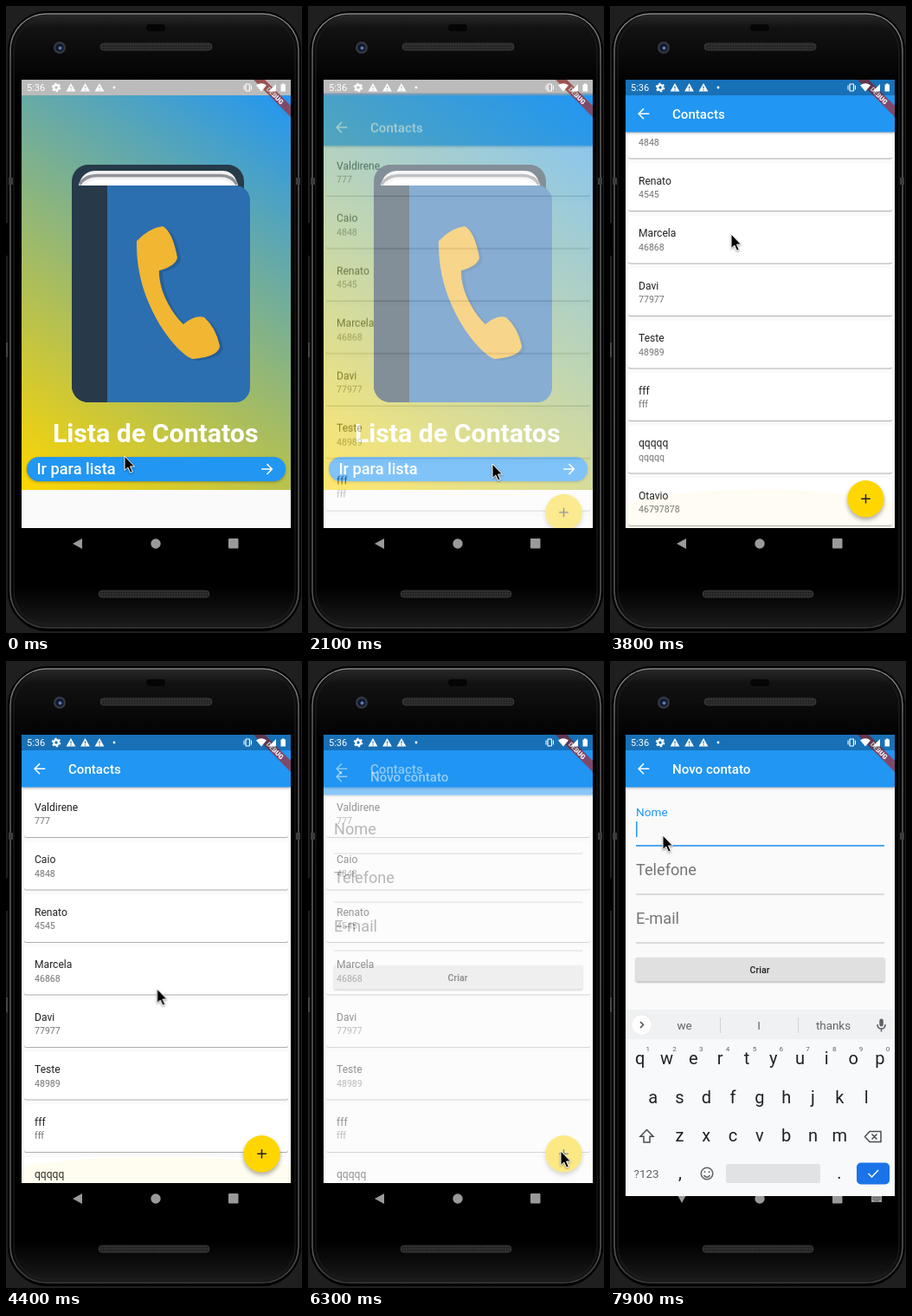
These frames come from a looping animation (342x723 px, 8000 ms). An HTML page:

```html
<!DOCTYPE html>
<html lang="pt">
<head>
<meta charset="utf-8">
<title>Lista de Contatos</title>
<style>
html, body { margin: 0; width: 100%; height: 100%; overflow: hidden; background: #1f1f1f; }
svg { display: block; width: 342px; height: 723px; font-family: Roboto, "Noto Sans", sans-serif; }
.mid { text-anchor: middle; }
.medium { font-weight: 500; }
.title { font-size: 15.1px; font-weight: 500; fill: #fff; }
.name { font-size: 12.1px; fill: #212121; }
.phone { font-size: 10.6px; fill: #757575; }
.label { font-size: 18.16px; fill: #757575; }
.key { font-size: 20px; fill: #202124; }
.hint { font-size: 8px; fill: #5f6368; }
.word { font-size: 13.4px; fill: #5f6368; }
.card { fill: #fff; filter: drop-shadow(0 1px .7px rgba(0,0,0,.3)); }
.bar { fill: #2196f3; filter: drop-shadow(0 1.5px 1.5px rgba(0,0,0,.3)); }
.line { fill: none; stroke-width: 1.5; }

.page, .page > g, #list, .glow, #label, #keys, .swap, .focus, #pointer {
  animation: 8s linear infinite both;
}
/* Page entry: fade in while sliding up a quarter of the screen */
#contacts { animation-name: fade1; }
#contacts > g { animation-name: rise1; }
#form { animation-name: fade2; }
#form > g { animation-name: rise2; }
@keyframes fade1 {
  0% { opacity: 0; }
  24% { opacity: 0; animation-timing-function: cubic-bezier(.42,0,1,1); }
  27.75%, 100% { opacity: 1; }
}
@keyframes rise1 {
  0% { transform: translateY(129px); }
  24% { transform: translateY(129px); animation-timing-function: cubic-bezier(.4,0,.2,1); }
  27.75%, 100% { transform: none; }
}
@keyframes fade2 {
  0% { opacity: 0; }
  76.2% { opacity: 0; animation-timing-function: cubic-bezier(.42,0,1,1); }
  79.95%, 100% { opacity: 1; }
}
@keyframes rise2 {
  0% { transform: translateY(129px); }
  76.2% { transform: translateY(129px); animation-timing-function: cubic-bezier(.4,0,.2,1); }
  79.95%, 100% { transform: none; }
}

#list { animation-name: scroll; }
@keyframes scroll {
  0% { transform: none; }
  40% { transform: none; animation-timing-function: steps(7, jump-start); }
  48.75% { transform: translateY(-88px); }
  51.25% { transform: translateY(-88px); animation-timing-function: steps(4, jump-start); }
  56.25%, 100% { transform: none; }
}
.glow { fill: #ffd600; }
#glowTop { transform-origin: 0 145.5px; animation-name: glowTop; }
#glowEnd { transform-origin: 0 602px; animation-name: glowEnd; }
@keyframes glowTop {
  0%, 56.25% { transform: scaleY(0); opacity: 0; }
  62.5%, 66.25% { transform: none; opacity: .2; }
  71.25%, 100% { transform: scaleY(0); opacity: 0; }
}
@keyframes glowEnd {
  0%, 46.25% { transform: scaleY(0); opacity: 0; }
  47.5% { transform: scaleY(.85); opacity: .05; }
  62.5%, 66.25% { transform: scaleY(.3); opacity: .08; }
  70%, 100% { transform: scaleY(0); opacity: 0; }
}

#label { transform-origin: 30px 191px; animation-name: float; }
@keyframes float {
  0%, 94.9% { transform: none; fill: #757575; }
  97.5%, 100% { transform: translateY(-12px) scale(.75); fill: #2196f3; }
}
.focus { fill: #2196f3; animation-name: show; }
@keyframes show { 0%, 95% { opacity: 0; } 96.25%, 100% { opacity: 1; } }
#keys { animation-name: keys; }
@keyframes keys {
  0%, 95.4% { transform: translateY(23px); opacity: 0; }
  98.6%, 100% { transform: none; opacity: 1; }
}
.swap { animation-timing-function: step-end; }
#navBack { animation-name: hide; }
#navDown { animation-name: appear; }
@keyframes hide { 0% { opacity: 1; } 96.25%, 100% { opacity: 0; } }
@keyframes appear { 0% { opacity: 0; } 96.25%, 100% { opacity: 1; } }

#pointer { animation-name: point; animation-timing-function: steps(1, jump-start); }
@keyframes point {
  0% { transform: translate(136px,518px); }
  2.5% { transform: translate(136px,518px); animation-timing-function: steps(4, jump-start); }
  7.5% { transform: translate(190px,539px); animation-timing-function: steps(3, jump-start); }
  11.25%, 15% { transform: translate(213px,535px); }
  16.25% { transform: translate(175px,530px); }
  17.5% { transform: translate(164px,534px); }
  18.75% { transform: translate(190px,529px); }
  20%, 36.25% { transform: translate(212px,527px); }
  37.5% { transform: translate(171px,372px); }
  38.75% { transform: translate(171px,372px); animation-timing-function: steps(8, jump-start); }
  48.75% { transform: translate(139px,262px); }
  50% { transform: translate(139px,262px); animation-timing-function: steps(9, jump-start); }
  61.25% { transform: translate(201px,469px); }
  66.25% { transform: translate(201px,469px); animation-timing-function: steps(4, jump-start); }
  71.25%, 72.5% { transform: translate(280px,559px); }
  73.75% { transform: translate(297px,566px); }
  75% { transform: translate(291px,564px); }
  83.75% { transform: translate(291px,564px); animation-timing-function: steps(4, jump-start); }
  88.75% { transform: translate(37px,183px); animation-timing-function: steps(2, jump-start); }
  91.25%, 92.5% { transform: translate(58px,207px); }
  93.75%, 95% { transform: translate(56px,203px); }
  96.25%, 100% { transform: translate(60px,200px); }
}
.sky { width: 311px; height: 455px; background: linear-gradient(214.35deg, #2196f3, #ffd600); }
</style>
</head>
<body>
<svg viewBox="0 0 342 723" xmlns="http://www.w3.org/2000/svg">
  <defs>
    <clipPath id="screen"><rect x="18" y="85" width="311" height="517"/></clipPath>
    <clipPath id="view"><rect x="18" y="145.5" width="311" height="456.5"/></clipPath>
    <linearGradient id="body" x2="0" y2="1">
      <stop offset="0" stop-color="#2b2b2b"/><stop offset=".025" stop-color="#121212"/>
      <stop offset=".12" stop-color="#000"/><stop offset=".93" stop-color="#000"/>
      <stop offset="1" stop-color="#1c1c1c"/>
    </linearGradient>
    <linearGradient id="rim" x2="0" y2="1">
      <stop offset="0" stop-color="#8a8a8a"/><stop offset=".08" stop-color="#5c5c5c"/>
      <stop offset=".95" stop-color="#555"/><stop offset="1" stop-color="#3a3a3a"/>
    </linearGradient>
    <pattern id="mesh" width="3" height="3" patternUnits="userSpaceOnUse">
      <rect width="3" height="3" fill="#2e2e2e"/><circle cx="1.5" cy="1.5" r=".8" fill="#161616"/>
    </pattern>
    <path id="back" d="M6.3 0H-5.6M0-5.9-5.9 0 0 5.9" class="line"/>
    <path id="warn" d="M0-5 5.4 4.5H-5.4ZM-.6-1.6V1.3H.6V-1.6ZM-.6 2.2V3.4H.6V2.2Z" fill-rule="evenodd"/>
    <path id="handset" d="M151 271Q165 256 181 254Q192 259 198 290Q196 300 177 305C176 325 189 352 205 367Q218 356 229 359Q242 370 247 392Q246 404 217 407C205 408 149 350 151 271Z"/>
  </defs>

  <!-- Phone -->
  <rect width="342" height="723" fill="#1f1f1f"/>
  <rect y="250" width="5" height="38" rx="1.5" fill="#000"/>
  <rect y="388" width="2" height="17" fill="#444"/>
  <rect x="4" y="8" width="335" height="711" rx="44" fill="url(#body)" stroke="#000" stroke-width="4"/>
  <rect x="5" y="9" width="333" height="708" rx="42" fill="none" stroke="url(#rim)" stroke-width="1.6"/>
  <rect x="9" y="14" width="325" height="699" rx="38" fill="none" stroke="#202020"/>
  <path d="M3 198H8V206H3ZM335 198H340V206H335Z" fill="#3c3c3c"/>
  <rect x="162" y="21" width="22" height="8" rx="4" fill="#050505"/>
  <circle cx="62" cy="48" r="7" fill="#333842"/>
  <circle cx="62" cy="48" r="4.6" fill="#10182c"/>
  <circle cx="62.5" cy="48.5" r="2" fill="#5a78b4"/>
  <rect x="109" y="43" width="129" height="8" rx="4" fill="url(#mesh)" stroke="#3a3a3a"/>
  <rect x="107" y="674" width="128" height="8" rx="4" fill="url(#mesh)" stroke="#333"/>

  <g fill="#9a9a9a">
    <path id="navBack" class="swap" d="M77 620 88 614V626Z"/>
    <g id="navDown" class="swap">
      <path d="M77 614H89L83 625Z"/>
      <path d="M302 615H314V624H302Z"/>
      <path d="M303.5 618.5H312.5M303.5 620.5H312.5M305.5 622.5H310.5" stroke="#222" stroke-dasharray="1 1"/>
    </g>
    <circle cx="173" cy="620" r="5.7"/>
    <rect x="257" y="614" width="11.5" height="11.5" rx="1"/>
  </g>

  <g clip-path="url(#screen)">
    <!-- Home -->
    <rect x="18" y="85" width="311" height="517" fill="#fafafa"/>
    <foreignObject x="18" y="103" width="311" height="455"><div class="sky"></div></foreignObject>
    <rect x="76" y="183" width="199" height="274" rx="19" fill="#263a4a"/>
    <path d="M84 207Q88 190 104 190H250Q264 190 268 207Z" fill="#f1f1f1"/>
    <path d="M85 206Q91 195.5 106 195.5H248Q261 195.5 267 206" fill="none" stroke="#8f9296" stroke-width="3.5"/>
    <path d="M91 207Q97 200 108 200H246Q257 200 262 207Z" fill="#fff"/>
    <path d="M76 207H117V457H95A19 19 0 0 1 76 438Z" fill="#263a4a"/>
    <path d="M117 207H265A17 17 0 0 1 282 224V440A17 17 0 0 1 265 457H117Z" fill="#2c6fb0"/>
    <use href="#handset" x="4" y="2" fill="#255f99"/>
    <use href="#handset" fill="#f1b632"/>
    <text x="172.7" y="502.5" class="mid" font-size="30.25" font-weight="700" fill="#fff">Lista de Contatos</text>
    <rect x="24" y="520" width="299" height="28" rx="14" class="bar"/>
    <text x="35.5" y="540.3" class="medium" font-size="18.16" fill="#fff">Ir para lista</text>
    <use href="#back" transform="translate(301.5 534) scale(-1 1)" stroke="#fff"/>

    <!-- Contact list -->
    <g id="contacts" class="page"><g>
      <rect x="18" y="85" width="311" height="517" fill="#fafafa"/>
      <g clip-path="url(#view)">
        <g id="list"></g>
        <ellipse id="glowTop" class="glow" cx="173.5" cy="-115.5" rx="466" ry="314"/>
        <ellipse id="glowEnd" class="glow" cx="173.5" cy="863" rx="466" ry="314"/>
      </g>
      <rect x="18" y="85" width="311" height="60.5" class="bar"/>
      <use href="#back" x="39" y="124.3" stroke="#fff"/>
      <text x="72" y="129.8" class="title">Contacts</text>
      <circle cx="295.5" cy="568.3" r="21.2" fill="#ffd600" style="filter:drop-shadow(0 3px 2.5px rgba(0,0,0,.32))"/>
      <path d="M290.2 568.3H300.8M295.5 563V573.6" class="line" stroke="#212121"/>
    </g></g>

    <!-- New contact -->
    <g id="form" class="page"><g>
      <rect x="18" y="85" width="311" height="517" fill="#fafafa"/>
      <rect x="18" y="85" width="311" height="60.5" class="bar"/>
      <use href="#back" x="39" y="124.3" stroke="#fff"/>
      <text x="72" y="129.8" class="title">Novo contato</text>
      <path d="M30 213H317M30 269H317M30 325H317" stroke="#b0b0b0" stroke-width=".9"/>
      <text id="label" x="30" y="191" class="label">Nome</text>
      <text x="30" y="247" class="label">Telefone</text>
      <text x="30" y="303" class="label">E-mail</text>
      <g class="focus">
        <rect x="30" y="212.2" width="287" height="1.5"/>
        <rect x="30" y="185" width="1.5" height="18"/>
      </g>
      <rect x="30" y="342" width="287" height="27.5" rx="1.5" fill="#e0e0e0" style="filter:drop-shadow(0 1px 1px rgba(0,0,0,.35))"/>
      <text x="173" y="359.5" class="mid medium" font-size="10.6" fill="#212121">Criar</text>
    </g></g>

    <!-- Debug ribbon -->
    <g transform="translate(329 85) rotate(45)">
      <rect x="-40" y="21.2" width="80" height="9.2" fill="#b71c1c" fill-opacity=".63"/>
      <text y="28.5" class="mid" font-size="7.7" font-weight="900" fill="#fff">DEBUG</text>
    </g>

    <!-- Status bar -->
    <rect x="18" y="85" width="311" height="18" fill="#000" fill-opacity=".25"/>
    <g fill="#fff">
      <text x="24" y="98" font-size="11">5:36</text>
      <circle cx="58" cy="94" r="2.8" fill="none" stroke="#fff" stroke-width="2.2"/>
      <circle cx="58" cy="94" r="4.5" fill="none" stroke="#fff" stroke-width="1.6" stroke-dasharray="2.36"/>
      <use href="#warn" x="75" y="94"/><use href="#warn" x="91.5" y="94"/><use href="#warn" x="108" y="94"/>
      <circle cx="125" cy="94" r="1.4"/>
      <rect x="277" y="90" width="4.5" height="8" rx=".7" fill="none" stroke="#fff" stroke-width="1.2"/>
      <path d="M275 91.5V96.5M283.5 91.5V96.5" stroke="#fff"/>
      <path d="M289 91.5Q295 87 301 91.5L295 98.5Z"/>
      <path d="M303.5 98.5H312V90Z"/>
      <path d="M317.5 90.5H319V89.5H321.5V90.5H323V98.5H317.5Z"/>
    </g>
  </g>

  <!-- Keyboard -->
  <g id="keys">
    <rect x="18" y="402" width="311" height="215" fill="#f8f9fb"/>
    <rect x="18" y="402" width="311" height="34" fill="#eff1f3"/>
    <circle cx="36.5" cy="419.5" r="11.5" fill="#fff" style="filter:drop-shadow(0 .5px .7px rgba(0,0,0,.25))"/>
    <path d="M35 416 38.5 419.5 35 423" class="line" stroke="#4a4d51"/>
    <path d="M127.5 411V429M217.5 411V429" stroke="#d0d3d6"/>
    <rect x="311.3" y="412.5" width="4.5" height="9" rx="2.25" fill="#5f6368"/>
    <path d="M309 419Q309 424 313.5 424T318 419M313.5 424V427.5" class="line" stroke="#5f6368"/>
    <path d="M42.5 540.5 50 548.3H46V555H39V548.3H35Z" class="line" stroke="#4a4d51"/>
    <path d="M300 542.5H313V554.5H300L294.5 548.5ZM302.5 545.5 308.5 551.5M308.5 545.5 302.5 551.5" class="line" stroke="#4a4d51"/>
    <g transform="translate(112 591)" class="line" stroke="#5f6368">
      <circle r="6.8"/>
      <path d="M-3.5 2Q0 6.5 3.5 2M-2.5-2.8V-1M2.5-2.8V-1"/>
    </g>
    <rect x="134" y="580" width="109" height="22" rx="2.5" fill="#e0e2e4"/>
    <rect x="285" y="578.5" width="38" height="25" rx="5" fill="#1a73e8"/>
    <path d="M298.5 591 302.5 595 310 587" class="line" stroke="#fff"/>
  </g>

  <g id="pointer">
    <path d="M1 1V17.5L4.8 14 7.6 20.2 10.3 19 7.5 13H12.5Z" stroke="#fff" style="filter:drop-shadow(.5px 1.5px 1px rgba(0,0,0,.4))"/>
  </g>
</svg>
<script>
const $ = id => document.getElementById(id);
function add(parent, tag, attrs, text = '') {
  const el = document.createElementNS('http://www.w3.org/2000/svg', tag);
  for (const k in attrs) el.setAttribute(k, attrs[k]);
  el.textContent = text;
  parent.append(el);
}

const contacts = [
  ['Valdirene', '777'], ['Caio', '4848'], ['Renato', '4545'], ['Marcela', '46868'],
  ['Davi', '77977'], ['Teste', '48989'], ['fff', 'fff'], ['qqqqq', 'qqqqq'], ['Otavio', '46797878']
];
contacts.forEach(([name, phone], i) => {
  const y = 148.5 + i * 60.5;
  add($('list'), 'rect', { x: 21, y, width: 305, height: 54.5, rx: 2.5, class: 'card' });
  add($('list'), 'text', { x: 33, y: y + 24.2, class: 'name' }, name);
  add($('list'), 'text', { x: 33, y: y + 39.5, class: 'phone' }, phone);
});

const key = (x, y, text, kind = 'key') => add($('keys'), 'text', { x, y, class: 'mid ' + kind }, text);
const row = (letters, x, y) => [...letters].forEach((c, i) => key(x + i * 30.8, y, c));
row('qwertyuiop', 34.7, 465);
row('asdfghjkl', 49.7, 509.5);
row('zxcvbnm', 80.5, 554);
for (let i = 0; i < 10; i++) key(43.7 + i * 30.8, 450, (i + 1) % 10, 'hint');
key(86, 424.5, 'we', 'word');
key(172, 424.5, 'I', 'word');
key(258, 424.5, 'thanks', 'word');
key(42, 595.5, '?123', 'word');
key(81, 597, ',');
key(265, 597, '.');
</script>
</body>
</html>
```
